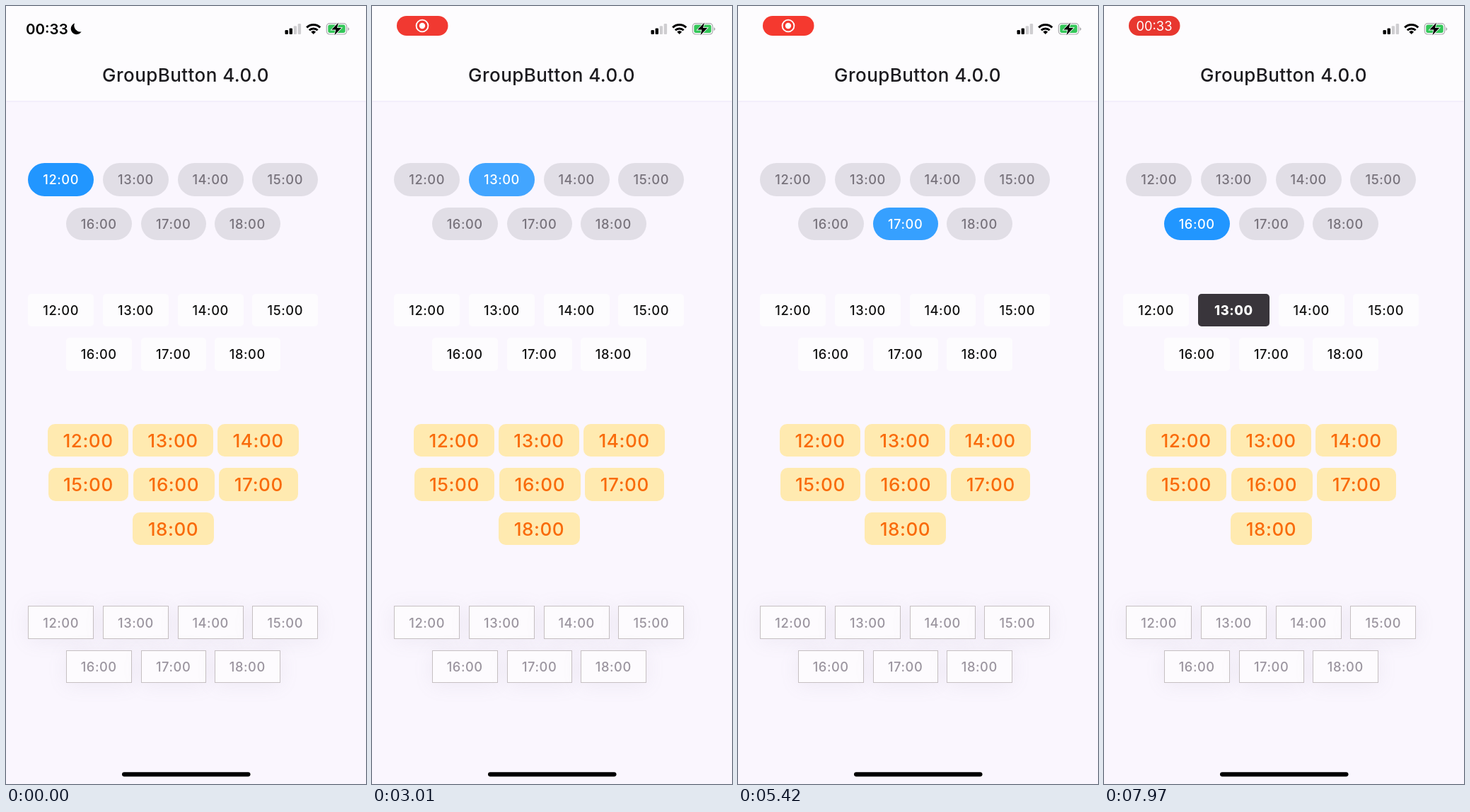
Recreate the animation shown at these times as an HTML page. Size 509 by 1100 pixels, loop 7.99 s.

```html
<!DOCTYPE html>
<html lang="en">
<head>
<meta charset="utf-8">
<title>GroupButton</title>
<style>
  html, body { margin: 0; width: 100%; height: 100%; overflow: hidden; background: #faf6fe; }
  body { position: relative; font-family: Inter, Roboto, sans-serif; }
  header {
    position: absolute; inset: 0 0 auto; height: 134px; background: #fdfcfe;
    box-shadow: 0 1px 2px rgba(150, 120, 200, .12);
  }
  h1 {
    position: absolute; left: 0; top: 82px; width: 508px; margin: 0; text-align: center;
    font: 500 26px/32px Inter, Roboto, sans-serif; letter-spacing: .45px; color: #1c1b1f;
  }
  svg { position: absolute; left: 0; top: 0; overflow: visible; }
  .btn {
    position: absolute; box-sizing: border-box; height: 46.7px; overflow: hidden;
    display: flex; align-items: center; justify-content: center;
    font-size: 18.3px; font-weight: 500; letter-spacing: .03em; white-space: nowrap;
  }
  .pill { border-radius: 24px; background: #e1dee6; color: #77727b; }
  .plain { border-radius: 5px; background: #fdfcfe; color: #111; }
  .amber {
    border-radius: 10px; background: #ffeab0; color: #f96b0b;
    font-size: 26.1px; letter-spacing: .02em;
  }
  .outline {
    border: 1.4px solid #c6c0c2; background: #fdfbfe; color: #9b959f;
    box-shadow: 0 3px 28px rgba(150, 135, 165, .11);
  }
  .ripple {
    position: absolute; left: 70%; top: 25%; width: 200px; height: 200px;
    margin: -100px; border-radius: 50%; background: #fff; opacity: 0;
  }
</style>
</head>
<body>
<header>
  <h1>GroupButton 4.0.0</h1>
  <svg width="509" height="60" viewBox="0 0 509 60">
    <g id="clock">
      <text x="28" y="39.8" font-size="20.5" font-weight="600">00:33</text>
      <path d="M97 24.6A8 8 0 1 0 106.6 36.2A8.6 8.6 0 0 1 97 24.6Z"/>
    </g>
    <g id="badge">
      <rect id="badgeFill" x="35" y="14" width="72.5" height="28" rx="14" fill="#d9322f"/>
      <g id="record">
        <circle cx="71" cy="28" r="8.4" fill="none" stroke="#fff" stroke-width="1.9"/>
        <circle cx="71" cy="28" r="4.2" fill="#fff"/>
      </g>
      <text id="badgeTime" x="71" y="34.7" font-size="18.3" text-anchor="middle" fill="#fff">00:33</text>
    </g>
    <rect x="394.5" y="34" width="4.4" height="6" rx="1.2"/>
    <rect x="400.6" y="31.4" width="4.4" height="8.6" rx="1.2"/>
    <g fill="#cfced1">
      <rect x="406.7" y="28.2" width="4.4" height="11.8" rx="1.2"/>
      <rect x="412.7" y="25" width="4.4" height="15" rx="1.2"/>
    </g>
    <g fill="none" stroke="#000" stroke-width="3">
      <path d="M425.2 30.4A13.6 13.6 0 0 1 444.2 30.4"/>
      <path d="M428.8 34.3A8.4 8.4 0 0 1 440.6 34.3"/>
    </g>
    <path d="M431.3 36.5A5 5 0 0 1 438.1 36.5L434.7 40Z"/>
    <rect x="453.3" y="24.6" width="28.4" height="15.4" rx="4.4" fill="none" stroke="#aaa9ad" stroke-width="1.2"/>
    <path d="M483.4 30V35Q485.3 34 485.3 32.5Q485.3 31 483.4 30Z" fill="#aaa9ad"/>
    <rect x="455.3" y="26.6" width="24.4" height="11.4" rx="2.7" fill="#34c759"/>
    <path d="M470 23.6L460.3 33.6H466.4L464.4 41.2L474.2 31H468Z" stroke="#fdfcfe" stroke-width="1.6" paint-order="stroke"/>
    <rect x="164" y="1083.2" width="181.5" height="6.3" rx="3.15"/>
  </svg>
</header>
<script>
  const LOOP = 7990;
  const $ = id => document.getElementById(id);

  // steps: [time in ms, properties]; the ends are held, steps past the loop are dropped.
  function play(el, steps) {
    const inside = steps.filter(([ms]) => ms <= LOOP);
    const held = [[0, inside[0][1]], ...inside, [LOOP, inside[inside.length - 1][1]]];
    const frames = held.map(([ms, props]) => ({ ...props, offset: ms / LOOP }));
    el.animate(frames, { duration: LOOP, iterations: Infinity });
  }

  function addButton(style, hour, x, y, width) {
    const el = document.createElement('div');
    el.className = 'btn ' + style;
    el.textContent = hour + ':00';
    Object.assign(el.style, { left: x + 'px', top: y + 'px', width: width + 'px' });
    document.body.append(el);
    return el;
  }

  const wide = [[31.2, 93], [137, 93], [242.7, 93], [348.3, 93], [84.7, 93], [190.6, 92], [294.8, 93]];
  const large = [[59, 114], [179, 114], [299.2, 114.8], [59.5, 113.8], [179.7, 115.2], [301.2, 112.2], [179, 115]];

  function addGroup(style, top, spots, columns) {
    return spots.map(([x, width], i) =>
      addButton(style, 12 + i, x, top + 62.5 * Math.floor(i / columns), width));
  }

  const pills = addGroup('pill', 222.1, wide, 4);
  const plains = addGroup('plain', 406.5, wide, 4);
  addGroup('amber', 590.8, large, 3);
  addGroup('outline', 848.3, wide, 4);

  const FADE = 200;

  function press(el, down, up) {
    const ripple = document.createElement('div');
    ripple.className = 'ripple';
    el.append(ripple);
    play(ripple, [
      [down, { opacity: 0, transform: 'scale(.2)' }],
      [down + 60, { opacity: .15, transform: 'scale(.4)' }],
      [up + 100, { opacity: .15, transform: 'scale(1)' }],
      [up + 500, { opacity: .15, transform: 'scale(1)' }],
      [up + 750, { opacity: .1, transform: 'scale(1)' }],
      [up + 850, { opacity: .1, transform: 'scale(1)' }],
      [up + 1250, { opacity: 0, transform: 'scale(1)' }]
    ]);
    const flat = { boxShadow: '0 0 0 rgba(0,0,0,0)' };
    const raised = { boxShadow: '0 1.5px 2px rgba(0,0,0,.28)' };
    play(el, [[down, flat], [down + 60, raised], [up, raised], [up + FADE, flat]]);
  }

  const grey = { backgroundColor: '#e1dee6', color: '#77727b' };
  const blue = { backgroundColor: '#2196ff', color: '#fff' };

  // Each tap moves the single selection to another pill.
  const taps = [
    { i: 0 },
    { i: 1, down: 2480, up: 2640 },
    { i: 2, down: 3560, up: 3700 },
    { i: 5, down: 4390, up: 4620 },
    { i: 4, down: 5780, up: 5940 }
  ];
  taps.forEach(({ i, down, up }, n) => {
    const next = taps[n + 1];
    const steps = down ? [[up, grey], [up + FADE, blue]] : [[0, blue]];
    if (next) steps.push([next.up, blue], [next.up + FADE, grey]);
    play(pills[i], steps);
    if (down) press(pills[i], down, up);
  });

  // The bold selected label widens its button and pushes the row apart.
  const pick = 7200;
  press(plains[1], 7040, pick);
  play(plains[1], [
    [pick, { left: '137px', width: '93px', backgroundColor: '#fdfcfe', color: '#111', fontWeight: 500 }],
    [pick + FADE, { left: '133px', width: '100.8px', backgroundColor: '#242026', color: '#fff', fontWeight: 800 }]
  ]);
  [[0, -4], [2, 4], [3, 4]].forEach(([i, dx]) => play(plains[i], [
    [pick, { transform: 'translateX(0)' }],
    [pick + FADE, { transform: `translateX(${dx}px)` }]
  ]));

  const hidden = { opacity: 0 }, shown = { opacity: 1 };
  play($('clock'), [[250, shown], [550, hidden]]);
  $('badge').style.transformOrigin = '71px 28px';
  play($('badge'), [
    [550, { opacity: 0, transform: 'scale(.7)' }],
    [950, { opacity: 1, transform: 'scale(1)' }]
  ]);
  play($('record'), [[6950, shown], [7200, hidden]]);
  play($('badgeTime'), [[6950, hidden], [7200, shown]]);
  play($('badgeFill'), [
    [550, '#ff3b30'], [1000, '#f63931'], [1930, '#d9322f'], [2150, '#d8322e'],
    [3010, '#f13931'], [3900, '#ff3b30'], [4600, '#ff3b30'], [5420, '#f5392f'],
    [6300, '#dc342e'], [6700, '#d8322e'], [7970, '#e8372f']
  ].map(([ms, fill]) => [ms, { fill }]));
</script>
</body>
</html>
```
